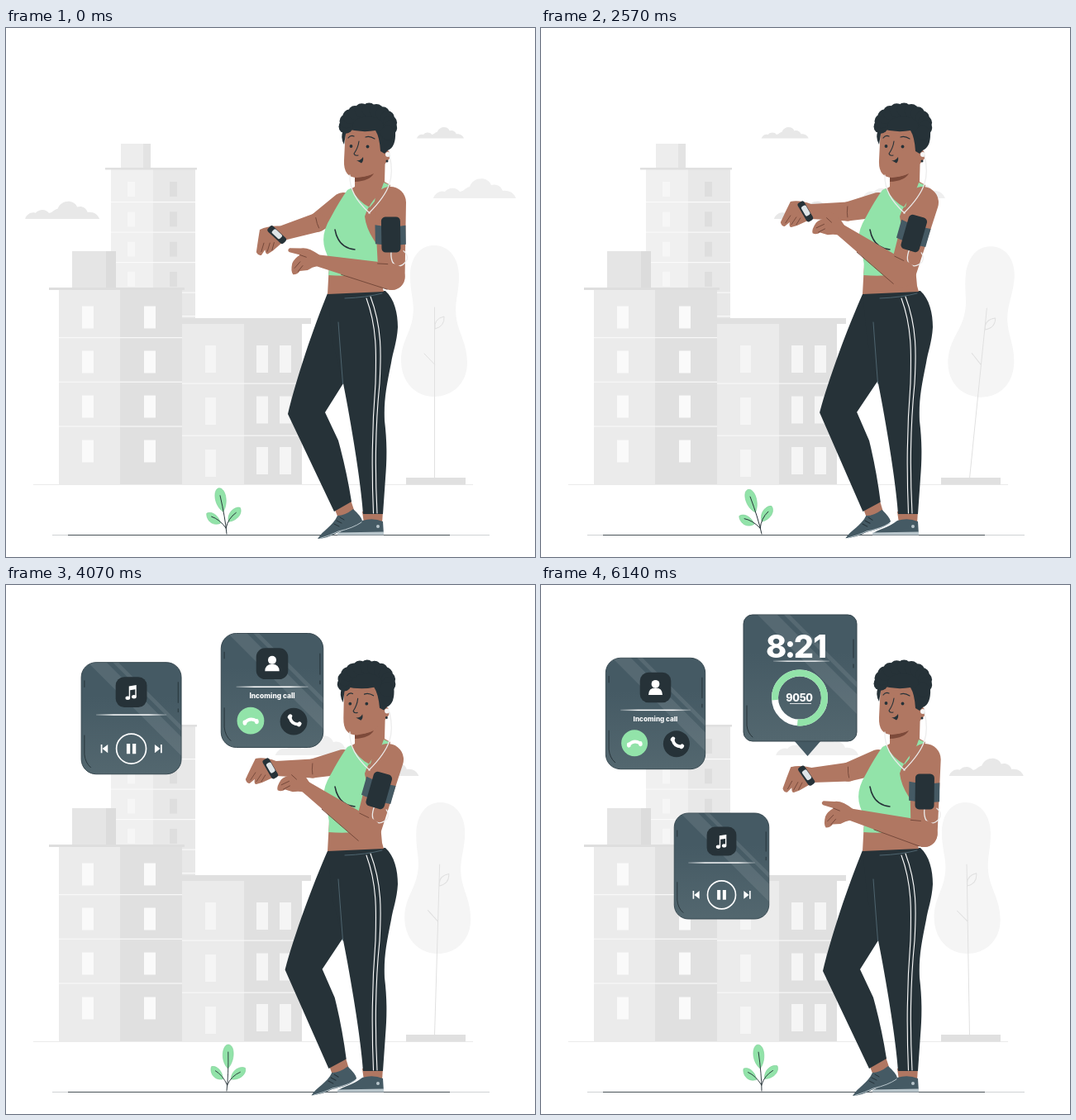
Animation of 640x640 px, one loop 6.21 s. Source, as an HTML page:

```html
<!DOCTYPE html>
<html lang="en">
<head>
<meta charset="utf-8">
<style>
html, body { margin: 0; height: 100%; overflow: hidden; background: #fff; }
svg { display: block; width: 100%; height: 100%; }
text { font-family: Inter, "Open Sans", sans-serif; font-weight: 800; fill: #fff; }
.line { fill: none; stroke-linecap: round; stroke-linejoin: round; }
.skin { fill: #b07762; }
.crease { fill: none; stroke: #74483a; stroke-width: .9; stroke-linecap: round; }
</style>
</head>
<body>
<svg viewBox="0 0 640 640">
<defs>
  <path id="cloud" d="M0 0C2-6 8-10 14-8C20-14 28-13 32-8C36-8 38-12 44-14C48-26 66-27 70-16C76-18 82-15 84-9C92-10 98-6 100 0Z"/>
  <linearGradient id="glass" x2="0" y2="1"><stop offset=".3" stop-color="#455a64"/><stop offset="1" stop-color="#53676f"/></linearGradient>
  <linearGradient id="rule"><stop stop-color="#fff" stop-opacity=".2"/><stop offset=".25" stop-color="#fff"/><stop offset=".75" stop-color="#fff"/><stop offset="1" stop-color="#fff" stop-opacity=".2"/></linearGradient>
  <rect id="card" x="-64" y="-71.500" width="128" height="143" rx="19"/>
  <clipPath id="cardClip"><use href="#card"/></clipPath>
  <clipPath id="timeClip"><rect x="245" y="36" width="137" height="153" rx="11"/></clipPath>
  <g id="base">
    <use href="#card" fill="url(#glass)" stroke="#33454d"/>
    <path clip-path="url(#cardClip)" fill="#fff" opacity=".09" d="M-56-72h24L65 25v24ZM-24-72h7L65 10v7Z"/>
    <path class="line" stroke="#263238" d="M-60 22v24q1 11 8 17M60-46v26M60-12v4M-60-48v8"/>
    <rect x="-20" y="-53" width="40" height="39" rx="11" fill="#263238"/>
    <rect x="-45" y="-5.200" width="90" height="1.600" fill="url(#rule)"/>
  </g>
  <g id="handset" class="line" stroke="#fff"><path stroke-width="4" d="M-7 1Q0-4.500 7 1"/><path stroke-width="5" d="M-7.500 1v1.500M7.500 1v1.500"/></g>
</defs>

<g fill="#e8e8e8"><use id="cloudL" href="#cloud"/><use id="cloudS" href="#cloud"/><use id="cloudR" href="#cloud" fill="#efefef"/></g>

<path stroke="#ebebeb" d="M33 552.500H565"/>
<g id="city"></g>

<path fill="#e0e0e0" d="M484 544h72v8.500h-72z"/>
<g id="tree">
  <path fill="#f5f5f5" d="M518 263C537 263 548 280 548 300C548 322 542 332 545 352C548 370 558 382 558 405C558 430 540 446 518 446C496 446 478 429 478 402C478 380 489 370 492 350C495 332 489 322 489 300C489 280 499 263 518 263Z"/>
  <path class="line" stroke="#e0e0e0" d="M518.500 338V545M519 364Q517 352 530 349Q531 361 519 364M518.500 407L506 394"/>
</g>

<path stroke="#cfd2d4" d="M56 613.500H585"/><path stroke="#4a5358" d="M75 613.500H537"/>
<g id="plant">
  <g fill="#92e3a9" stroke="#7fcf97" stroke-width=".6">
    <path d="M268 585C258 575 261 556 268 556C276 556 277 575 268 585Z"/>
    <path d="M262 598C250 600 246 589 248 583C254 581 262 588 262 598Z"/>
    <path d="M272 598C272 586 284 581 289 584C291 591 283 599 272 598Z"/>
  </g>
  <path class="line" stroke="#263238" stroke-width=".9" d="M267 612Q269 592 268 565M267.500 605Q262 593 253 588M267.500 605Q272 594 283 589"/>
</g>

<g id="woman">
  <path class="skin" d="M431 585h25l-1 14h-22z"/>
  <path fill="#455a64" d="M401 612C408 606 420 605 431 596Q444 592 456 597L457 613Z"/>
  <path fill="#b9c6cc" d="M401 610.500L457 609.500V613.500H401Z"/>
  <circle cx="450" cy="603" r="2" fill="#b9c6cc"/>
  <g id="leg">
    <path class="skin" d="M396 578L417 571L422 586L402 593Z"/>
    <path fill="#455a64" d="M377 618C383 608 396 602 401 590Q410 590 420 582Q430 591 431 596C425 604 412 607 402 610Q390 617 377 618Z"/>
    <path class="line" stroke="#b9c6cc" d="M380 617.500Q392 614 402 609Q420 605 430 598"/>
    <path class="line" stroke="#263238" d="M397 600l6 3M400 596l6 3M404 592l5 3"/>
    <path fill="#263238" d="M389 321L432 325L440 385L408 430L386 465L402 499Q412 535 418 573L397 585L341 467C351 425 371 365 389 321Z"/>
  </g>
  <path fill="#263238" d="M389 321L459 318C470 328 474 345 474 362C473 380 468 392 466 405C460 435 457 450 458 475C461 500 461 520 459 545L456 588H432C430 555 418 480 408 430L395 380Z"/>
  <path class="line" stroke="#536a75" stroke-width=".9" d="M402 356L407.500 430M410 327Q436 326 455 321"/>
  <path class="line" stroke="#fff" stroke-width="1.100" d="M436 327C449 362 448 395 447 430C443 480 442 530 444.500 587M441 325C455 362 454 395 452 430C447 480 446 530 449 587"/>

  <g id="upperL"><path class="skin"/><g id="foreL"><path class="skin"/><path class="crease" d="M0-6Q-1 2 0 7"/>
    <g transform="translate(-44)">
      <path class="skin" d="M0-9Q-14-14-25-12Q-31 0-37 13Q-36 18-32 18L-26 13Q-27 19-24 19L-17 17Q-8 13 0 9Z"/>
      <path class="crease" d="M-31 14l6-9M-24 16l6-9M-18 16l5-8"/>
      <g transform="translate(-7) rotate(60)">
        <rect x="-13" y="-4.500" width="26" height="9" rx="3" fill="#263238"/>
        <rect x="-7" y="-4" width="13" height="6.500" rx="2" fill="#dfe5e8"/>
      </g>
    </g>
  </g></g>

  <path class="skin" d="M413 197L422 192V170L459 148L458 186L465 190L452 250L453 290L455 312L457 319L389 322L391 285Z"/>
  <path fill="#7d4a3a" d="M422 180Q436 181 445 176Q440 185 422 186Z"/>
  <path fill="#92e3a9" d="M413 196L417 194Q427 211 440 217Q452 204 457 187L464 190Q440 208 434 228Q436 245 449 262L453 293Q424 302 390 299Q393 284 386 268Q380 250 393 229Q403 210 413 196Z"/>
  <path class="line" stroke="#263238" stroke-width="1.500" d="M398 244Q402 266 422 268"/>

  <g id="head">
    <path class="skin" d="M411 118L409 160Q408 181 425 181Q446 179 457 166L464 158Q466 147 458 147L456 110Z"/>
    <g fill="#263238">
      <path d="M408 124Q402 110 411 103Q428 92 448 98Q468 108 471 125Q472 144 462 148L458 152L453 149Q452 132 447 124Q430 127 412 122L409 141Q404 132 408 124Z"/>
      <g id="curls"></g>
    </g>
    <g class="line" stroke="#263238" stroke-width="1.200">
      <path d="M414 133Q417 129 421 131M435 132Q440 130 446 134"/>
      <path stroke-width="1.100" d="M427 137Q426 145 421 152Q422 155 426 154"/>
      <path id="shut" d="M414 144Q418 140 421 144M434 144Q438 140 442 144"/>
    </g>
    <g id="open" fill="#263238"><circle cx="417.500" cy="143" r="1.900"/><circle cx="437.500" cy="143.500" r="1.900"/></g>
    <path fill="#263238" d="M424 160Q429 161 432 156Q433 161 430 163.500Z"/>
    <circle cx="462" cy="153" r="3" fill="#f5f5f5"/><circle cx="461" cy="161" r="1.500" fill="#263238"/>
  </g>

  <g id="upperR"><path class="skin"/>
    <g transform="translate(-39) rotate(90)">
      <path fill="#455a64" d="M-19-12Q0-8 18-11V12Q0 14-19 11Z"/>
      <path class="line" stroke="#ececec" stroke-width="1.300" d="M0 20C-2 42 14 42 19 30Q20 24 15 20"/>
      <rect x="-11.500" y="-21.500" width="23" height="43" rx="5" fill="#263238"/>
    </g>
    <g id="foreR"><path class="skin"/><path class="crease" d="M-8-14Q-14-13-20-12M-2 16L-60 10.500"/>
      <g transform="translate(-93)">
        <path class="skin" d="M2-7Q-14-14-22-10L-35-7.500Q-38-4-34-2.500L-21-2Q-27 4-28 10Q-28 20-24 23Q-19 22-17 17L-8 14Q-3 9 2 7Z"/>
        <path class="crease" d="M-21-2L-13-1M-24 15l5-9M-19 18l4-8"/>
      </g>
    </g>
  </g>
  <path class="line" stroke="#ececec" stroke-width="1.300" d="M464 154C470 180 466 197 439 224M416 178Q415 202 440 224"/>
</g>

<g id="time">
  <path fill="#455a64" d="M306 188H339L322.500 207Z"/>
  <rect x="245" y="36" width="137" height="153" rx="11" fill="url(#glass)" stroke="#37474f"/>
  <path clip-path="url(#timeClip)" fill="#fff" opacity=".09" d="M262 36h24L382 132v24ZM294 36h7L382 117v7Z"/>
  <path class="line" stroke="#263238" d="M249 146v24q1 9 7 14M378 66v22M378 96v4"/>
  <text x="272" y="88" font-size="38" letter-spacing="-2.500">8:2</text>
  <g font-size="38" text-anchor="end"><text id="zero" x="356" y="88">0</text><text id="one" x="346" y="88">1</text></g>
  <rect x="281" y="91.500" width="68" height="1.300" fill="url(#rule)"/>
  <g fill="none" stroke-width="8"><circle cx="313" cy="136.500" r="30" stroke="#fff"/><circle id="ring" cx="313" cy="136.500" r="30" stroke="#92e3a9" pathLength="360"/></g>
  <text x="312.500" y="140.500" font-size="12.500" letter-spacing="-.3" text-anchor="middle">9050</text>
  <path stroke="#fff" stroke-width=".8" d="M301 143.500h26"/>
</g>
<g id="music">
  <use href="#base"/>
  <g fill="#fff"><ellipse cx="-4.500" cy="-26" rx="3" ry="2.400"/><ellipse cx="3.500" cy="-27.500" rx="3" ry="2.400"/><path d="M-3-41L6.500-42.500V-28H5V-37L-1.500-36V-26H-3Z"/></g>
  <circle cy="39" r="19" fill="none" stroke="#fff" stroke-width="1.800"/>
  <path fill="#fff" d="M-6 32.500h4.500v13h-4.500zM1.500 32.500h4.500v13h-4.500zM-39 33.500h1.800v11h-1.800zM-30 33.500v11l-7-5.500zM37.500 33.500h1.800v11h-1.800zM30 33.500v11l7-5.500z"/>
</g>
<g id="call">
  <use href="#base"/>
  <g fill="#fff"><circle cy="-38" r="5.200"/><path d="M-9-24Q-9-33 0-33Q9-33 9-24Z"/></g>
  <text y="10" font-size="8.700" text-anchor="middle">Incoming call</text>
  <circle cx="-27" cy="38" r="17" fill="#92e3a9"/><circle cx="27" cy="39" r="17" fill="#263238"/>
  <use id="accept" href="#handset"/><use id="reject" href="#handset"/>
</g>
</svg>
<script>
const LOOP = 6.21;
const $ = id => document.getElementById(id);
const set = (id, name, value) => $(id).setAttribute(name, value);
const move = (id, value) => set(id, 'transform', value);
const clamp = v => Math.max(0, Math.min(1, v));
const lerp = (a, b, q) => a + (b - a) * q;
const ramp = (t, from, to) => { const u = clamp((t - from) / (to - from)); return u * u * (3 - 2 * u); };

// Eased growth with a slight overshoot
function pop(t, start) {
  const u = clamp((t - start) / .48);
  return ramp(u, 0, 1) + .3 * u ** 3 * Math.sin(Math.PI * u);
}

// Tapered limb from the origin towards the left
function bone(id, length, r0, r1) {
  $(id).firstElementChild.setAttribute('d',
    `M0 ${-r0}L${-length} ${-r1}A${r1} ${r1} 0 0 0 ${-length} ${r1}L0 ${r0}A${r0} ${r0} 0 0 0 0 ${-r0}Z`);
}
bone('upperL', 38, 15, 11.5);
bone('foreL', 44, 11.5, 9);
bone('upperR', 90, 19, 16);
bone('foreR', 93, 16, 7);

function city() {
  let out = '';
  const box = (x, y, w, h, fill) => out += `<rect x="${x}" y="${y}" width="${w}" height="${h}" fill="${fill}"/>`;
  const rows = (x, y, step, count, w, h, fill) => {
    for (let i = 0; i < count; i++) box(x, y + i * step, w, h, fill);
  };
  const block = (x, mid, right, y, light, dark) => {
    box(x, y, mid - x, 552 - y, light);
    box(mid, y, right - mid, 552 - y, dark);
  };
  block(139, 166, 175, 140, '#ededed', '#e3e3e3');
  block(127, 178, 229, 170, '#f0f0f0', '#e8e8e8');
  box(120, 169, 111, 2.5, '#e0e0e0');
  rows(127, 210, 36.5, 4, 102, 1.2, '#fafafa');
  box(213, 348, 16, 1.2, '#fafafa');
  rows(147, 186, 36.3, 4, 9, 18, '#f6f6f6');
  rows(198, 186, 36.3, 4, 9, 18, '#dedede');

  block(80, 121, 133, 270, '#e5e5e5', '#dcdcdc');
  block(64, 138, 213, 317, '#ebebeb', '#e0e0e0');
  box(52, 314, 164, 3, '#dedede');
  rows(64, 374, 53.7, 3, 149, 1.2, '#f8f8f8');
  for (const x of [92, 167]) rows(x, 336.5, 54, 4, 14, 27, '#fafafa');

  block(213, 288, 358, 358, '#ebebeb', '#e0e0e0');
  box(213, 351, 156, 7, '#e0e0e0');
  rows(213, 429.5, 63, 2, 145, 1.2, '#f8f8f8');
  rows(241, 384, 63, 3, 13, 33, '#f5f5f5');
  for (const x of [303, 331]) rows(x, 384, 61.5, 3, 14, 33, '#f5f5f5');
  $('city').innerHTML = out;
}
city();

let curls = '';
for (let i = 0; i < 12; i++) {
  const a = Math.PI * (.98 + i * .107);
  curls += `<circle cx="${438 + 27 * Math.cos(a)}" cy="${118 + 19 * Math.sin(a)}" r="8.5"/>`;
}
$('curls').innerHTML = curls;

// Cards grow out of the watch
function card(id, x, y, size, grow) {
  move(id, `translate(${lerp(322, x, grow)} ${lerp(208, y, grow)}) scale(${size * grow})`);
  set(id, 'opacity', clamp(grow));
}

function arm(side, x, y, upper, fore, length) {
  move('upper' + side, `translate(${x} ${y}) rotate(${upper})`);
  move('fore' + side, `translate(${-length}) rotate(${fore - upper})`);
}

function draw(t) {
  const u = t / LOOP, drift = u + u * (1 - u) * (.27 + .7 * u);
  move('cloudL', `translate(${23 + 471 * drift} 231) scale(.9)`);
  move('cloudS', `translate(${497 - 419 * drift} 133.5) scale(.57)`);
  move('cloudR', `translate(${517 - 233 * drift} 206)`);

  move('tree', `rotate(${ramp(t, 0, 1.2) * (2 + 3.8 * Math.cos(1.05 * (t - 2.5)))} 519 545)`);
  move('plant', `rotate(${-11 - 13 * ramp(t, 0, 1.9) + 25 * ramp(t, 1.9, 4.1) - 7 * ramp(t, 4.2, 6.2)} 267 612)`);
  move('leg', `rotate(${2.05 * (ramp(t, .8, 3.1) - ramp(t, 3.1, 6.1))} 395 340)`);
  move('head', `rotate(${-1.6 * (ramp(t, 3.2, 4) - ramp(t, 4.5, 5.1))} 440 185)`);

  const left = ramp(t, .3, 1.9) - .3 * ramp(t, 4.3, 6.2);
  arm('L', 408, 214, lerp(-34, -12, left), lerp(-17, 0, left), 38);
  const right = ramp(t, .6, 1.95) - .9 * ramp(t, 4.4, 6.14);
  arm('R', lerp(465, 462, right), 211, lerp(-91, -74, right), lerp(12.4, 35.5, right), 90);

  const blink = Math.abs(t - 3.07) < .11 || Math.abs(t - 4.52) < .11;
  set('shut', 'opacity', +blink);
  set('open', 'opacity', +!blink);

  const aside = ramp(t, 3.25, 3.97);
  card('music', 319.5 - 168 * aside + 67 * ramp(t, 4.05, 5.1), 125 + 33 * aside + 182 * ramp(t, 4, 4.9),
    1 - .055 * aside - .05 * ramp(t, 4.3, 5.1), pop(t, 2.57));
  card('call', 322 - 183.5 * ramp(t, 4.1, 5.05), 127.5 + 28 * ramp(t, 4.4, 5.1),
    .965 - .025 * ramp(t, 4.4, 5.1), pop(t, 3.45));
  const ringing = 6 * Math.sin(t * 12);
  move('accept', `translate(-27 38) rotate(${ringing})`);
  move('reject', `translate(27 39) rotate(${ringing - 135})`);

  const grow = pop(t, 4.28);
  move('time', `translate(322 208) scale(${grow}) translate(-322 -208)`);
  set('time', 'opacity', clamp(grow));
  const turn = t - 5.14, arc = 243 + 37 * turn;
  set('ring', 'stroke-dasharray', `${arc} ${360 - arc}`);
  move('ring', `rotate(${32 + 143 * turn} 313 136.5)`);
  const tick = ramp(t, 5.55, 5.95);
  set('zero', 'opacity', 1 - tick);
  set('one', 'opacity', tick);
}

function frame(now) {
  draw(now / 1000 % LOOP);
  requestAnimationFrame(frame);
}
frame(performance.now());
</script>
</body>
</html>
```
